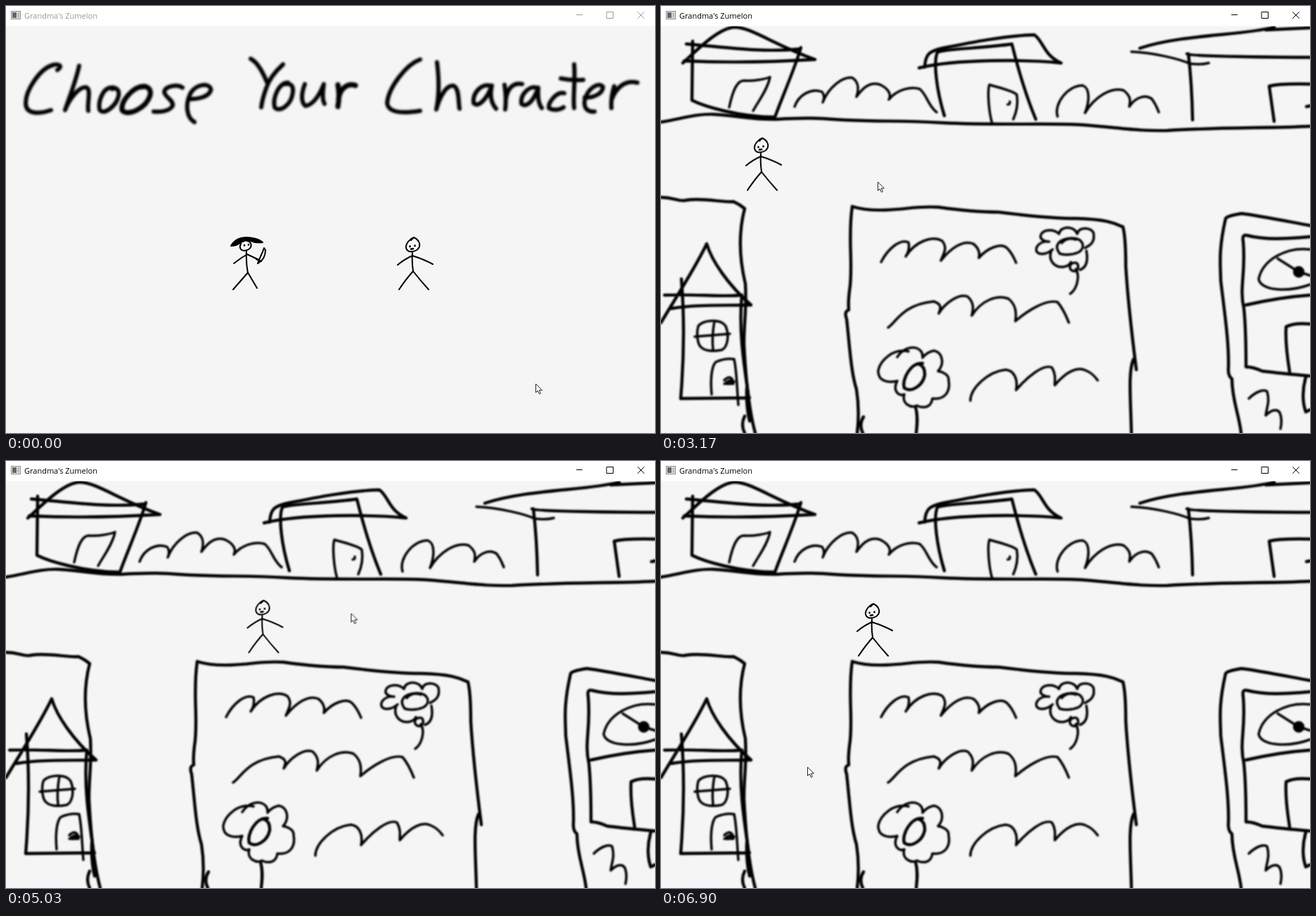
Recreate the animation shown at these times as an HTML page. Size 923 px wide and 607 px high, loop 6.99 s.

```html
<!DOCTYPE html>
<html lang="en">
<head>
<meta charset="utf-8">
<title>Grandma's Zumelon</title>
<style>
  html, body { margin: 0; width: 100%; height: 100%; overflow: hidden; background: #f5f5f5; }
  svg { display: block; width: 100vw; height: 100vh; }
  path { fill: none; stroke-linecap: round; stroke-linejoin: round; }
  .ink { stroke: #000; stroke-width: 4.4; filter: url(#soft); }
  .ink .thin { stroke-width: 3.5; }
  .lettering { stroke: #000; stroke-width: 6; filter: url(#blurry); }
  .lettering .heavy { stroke-width: 7.2; }
  .figure path { stroke: #000; stroke-width: 2; filter: url(#fine); }
  .figure .solid { fill: #000; }
  .figure .dots { stroke-width: 2.6; }
  .burst { stroke: #0808ff; stroke-width: 4.6; filter: url(#soft); }
  .caption { font: 11px "Open Sans", "Noto Sans", sans-serif; fill: currentColor; }
  .button { stroke: currentColor; stroke-width: 1; }

  .bar, .menu, .town, .burst { animation: 6990ms step-end infinite; }
  .bar { animation-name: focus; }
  .menu { animation-name: leave; }
  .town { animation-name: enter; }
  .burst { animation-name: hover; }
  .walker { animation: walk 6990ms linear infinite; }
  .cursor { animation: point 6990ms linear infinite; }

  @keyframes focus { 0% { color: #999; } 15.25%, 100% { color: #000; } }
  @keyframes leave { 0% { opacity: 1; } 18.83%, 100% { opacity: 0; } }
  @keyframes enter { 0% { opacity: 0; } 18.83%, 100% { opacity: 1; } }
  @keyframes hover { 0% { opacity: 0; } 5.52%, 100% { opacity: 1; } }

  @keyframes walk {
    0% { transform: translate(0, 0); }
    36.49% { transform: translate(0, 0); animation-timing-function: steps(10); }
    47.3% { transform: translate(110px, 16px); }
    47.45% { transform: translate(110px, 16px); animation-timing-function: steps(9); }
    57.6% { transform: translate(211px, 32px); animation-timing-function: steps(3); }
    60.6% { transform: translate(245px, 37px); }
    64.36% { transform: translate(245px, 37px); animation-timing-function: steps(10); }
    75.34% { transform: translate(354px, 14px); }
    75.55% { transform: translate(354px, 14px); animation-timing-function: steps(3); }
    78.77% { transform: translate(387px, 7px); animation-timing-function: steps(2); }
    80.92% { transform: translate(402px, 4px); }
    83.08% { transform: translate(402px, 4px); animation-timing-function: steps(9); }
    93.22% { transform: translate(302px, 19px); }
    93.29% { transform: translate(302px, 19px); animation-timing-function: steps(5); }
    98.65%, 100% { transform: translate(246px, 28px); }
  }

  @keyframes point {
    0% { transform: translate(753px, 537px); }
    .94% { transform: translate(753px, 537px); animation-timing-function: steps(6, jump-start); }
    7.81% { transform: translate(595px, 384px); animation-timing-function: step-end; }
    18.83% { transform: translate(595px, 388px); }
    28.09% { transform: translate(595px, 388px); animation-timing-function: steps(5); }
    33.28% { transform: translate(308px, 250px); }
    51.96% { transform: translate(308px, 250px); animation-timing-function: steps(5); }
    57.6% { transform: translate(440px, 222px); animation-timing-function: steps(4); }
    61.89% { transform: translate(461px, 215px); }
    65.46% { transform: translate(461px, 215px); animation-timing-function: steps(3); }
    68.75% { transform: translate(513px, 212px); }
    69.85% { transform: translate(513px, 212px); animation-timing-function: steps(5); }
    75.34% { transform: translate(400px, 235px); }
    75.55% { transform: translate(400px, 235px); animation-timing-function: steps(3); }
    78.77% { transform: translate(243px, 265px); animation-timing-function: steps(2); }
    80.92% { transform: translate(199px, 270px); }
    88.71% { transform: translate(199px, 270px); animation-timing-function: steps(4); }
    93.22% { transform: translate(210px, 412px); }
    93.29% { transform: translate(210px, 412px); animation-timing-function: steps(2); }
    95.44%, 100% { transform: translate(208px, 435px); }
  }
</style>
</head>
<body>
<svg viewBox="0 0 923 607" preserveAspectRatio="none">
  <defs>
    <filter id="fine" filterUnits="userSpaceOnUse" x="0" y="0" width="923" height="607"><feGaussianBlur stdDeviation=".4"/></filter>
    <filter id="soft" filterUnits="userSpaceOnUse" x="0" y="0" width="923" height="607"><feGaussianBlur stdDeviation=".8"/></filter>
    <filter id="blurry" filterUnits="userSpaceOnUse" x="0" y="0" width="923" height="607"><feGaussianBlur stdDeviation="1.4"/></filter>
    <g id="man" class="figure">
      <path d="M56 175C50 177 44 184 45 190C47 197 55 196 60 193C67 188 65 179 56 175L52 179"/>
      <path class="dots" d="M50.500 187.500v.5M57.500 186.500v.5M52 191.500L55 191"/>
      <path d="M54 197Q53 210 55 223M33 214Q44 205 54 201Q70 206 83 213M35 249Q45 234 55 223Q66 237 77 249"/>
    </g>
  </defs>

  <rect width="923" height="607" fill="#f5f5f5"/>

  <g class="menu">
    <g class="lettering">
      <!-- Choose -->
      <path d="M73 91C81 86 76 82 68 83.500C48 88 28 120 28 138C28 154 46 154 64 148"/>
      <path d="M104 85C100 105 90 130 84 148C90 132 104 114 114 115.500C122 118 115 138 117 149"/>
      <path d="M153 116C138 114 131 135 133 147C138 157 157 142 160 128C162 119 156 115 151 118"/>
      <path class="heavy" d="M197 114C180 114 163 136 165 148C172 158 199 146 205 127C207 117 200 113 193 115"/>
      <path d="M251 116C243 110 225 115 225 122C226 130 239 134 237 142C232 150 219 151 210 150"/>
      <path d="M260 132C270 133 289 130 291.500 119C290 109 272 110 263 123C254 140 257 159 268 165"/>
      <!-- Your -->
      <path d="M348 75C358 80 366 96 371 108M394 83C382 94 373 107 370 117C366 128 364 136 363 144"/>
      <path d="M401 109C388 109 379 130 382 144C388 152 406 142 408 122C409 113 404 109 397 111"/>
      <path d="M425 111C420 124 419 137 426 142C438 140 446 126 452 111C450 124 450 134 453 139"/>
      <path class="heavy" d="M472 112Q475 127 472 143M473 132C475 117 486 109 497 113"/>
      <!-- Character -->
      <path d="M589 76C569 83 544 116 542 138C544 154 570 152 589 149"/>
      <path d="M613 80C616 104 616 128 612 147C617 128 627 111 637 113.500C645 118 643 136 645 146"/>
      <path d="M690 114C677 109 663 123 665 138C672 146 685 130 691 113C688 126 690 138 697 146"/>
      <path d="M709 112Q712 131 710 147M711 132C713 117 722 108 734 111"/>
      <path d="M756 117C745 111 731 126 733 139C740 146 751 134 757 116C756 130 757 139 762 145"/>
      <path d="M794 124C784 121 771 136 772 145C778 149 787 148 793 144"/>
      <path d="M808 83C810 106 806 132 808 145M789 103Q804 106 821 105"/>
      <path d="M823 130C836 131 849 124 849 115C843 107 827 117 823 134C821 146 828 151 837 150"/>
      <path d="M865 114Q860 130 861 145M861 134C867 117 880 104 898 109"/>
    </g>

    <g class="figure">
      <path class="solid" d="M320 341C326 331 337 328 348 329.500Q360 331 365 336Q355 337 350 334.500Q341 331 333 337Q327 341 320 341z"/>
      <path d="M334 338C330 347 338 350 345 346C351 342 349 335 343 334"/>
      <path class="dots" d="M339 340v.5M345 339v.5"/>
      <path d="M342 347Q341 364 344 380M324 366Q334 358 343 353L360 361M323 403L344 379L357 401"/>
      <path d="M367 344C364 353 361 357 358 366Q369 360 369 347L367 344M356 360L363 363"/>
    </g>

    <path class="burst" d="M517 297Q535 308 557 320L560 296Q564 289 568 301L580 319Q593 300 607 292Q604 308 596 322Q620 310 641 306Q630 322 612 335L641 333L618 353Q636 358 655 357Q640 368 623 375L650 381L622 394L650 403L616 415L645 433L608 417Q613 430 611 446Q604 444 592 414Q578 435 569 448Q573 426 565 421Q552 430 541 448Q536 438 538 418L513 433Q522 420 540 412Q520 407 508 405Q525 401 541 398Q523 390 511 384Q530 382 546 381L510 362Q535 352 550 341Q529 336 514 335Q528 335 536 329Q517 305 517 297z"/>
    <use href="#man" x="524" y="154"/>
  </g>

  <g class="town">
    <g class="ink">
      <!-- upper row -->
      <path d="M31 81C45 69 80 31 105 30C130 31 160 55 219 76M36 54C80 57 140 67 198 61M33 78Q120 82 219 76"/>
      <path d="M45 50L44 134C60 142 110 158 162 158C172 130 190 90 199 59"/>
      <path class="thin" d="M97 144C102 120 108 106 118 106C132 107 148 104 155 101C152 118 138 136 131 149"/>
      <path class="thin" d="M190 143C196 126 214 116 229 122Q234 128 230 137C238 116 258 100 272 102C282 108 281 120 278 129C290 112 300 108 312 112C324 118 328 126 324 133C336 118 356 114 368 118C378 126 380 142 392 151"/>
      <path d="M375 87C376 66 384 64 400 60C440 52 490 42 531 41C544 50 544 70 569 81C520 76 420 75 367 88"/>
      <path d="M403 156C392 120 387 80 393 66C400 61 460 60 499 54C508 90 520 130 533 161"/>
      <path class="thin" d="M471 167C466 150 464 120 467 112C480 116 500 120 506 126C508 138 506 150 501 161M493 140q4 0 3-4"/>
      <path class="thin" d="M564 157C558 138 580 112 600 113C612 118 608 140 603 152C616 130 640 114 658 120C668 128 668 134 666 143C676 128 690 126 698 132C704 140 706 146 708 151"/>
      <path class="thin" d="M669 65C700 66 740 76 752 82Q768 84 779 81"/>
      <path d="M681 60C740 40 830 42 872 30M860 34L923 31M748 68Q752 72 923 73M750 68Q755 110 756 162M872 164L865 114Q880 110 923 111M918 143l5-1"/>
      <path d="M0 165C30 160 50 153 75 154C110 156 130 162 165 161C210 158 230 160 260 162C320 165 340 162 400 166C480 170 560 166 600 169C660 174 680 178 720 177C800 172 860 174 923 171"/>
      <!-- tower -->
      <path d="M0 272C20 272 24 279 36 276C60 272 90 280 103 278Q112 282 119 288C108 330 114 370 120 395C122 430 118 450 118 480C120 520 124 570 134 607"/>
      <path d="M0 450C24 410 50 370 65 338C72 362 95 396 128 425M5 411C50 409 80 414 114 411M15 430C50 424 90 426 128 425"/>
      <path d="M29 388C34 450 32 510 28 558L126 557M115 411C110 460 118 510 125 558M122 543Q121 570 126 590M119 583Q113 595 119 607"/>
      <path class="thin" d="M53 455C60 446 85 444 92 455C98 470 94 486 86 489C70 492 56 490 53 478Q50 466 53 455M48 470L98 466M76 448Q72 470 74 488"/>
      <path class="thin" d="M72 552C70 530 72 512 78 506Q92 500 104 502C108 520 108 545 110 567M90 532q8-8 12 0q-4 8-10 4q6-6 12-2M90 537h13"/>
      <!-- garden -->
      <path d="M272 285Q290 291 320 290C350 289 365 284 395 286C430 291 450 293 480 293C520 298 560 302 590 302C630 303 645 308 657 314Q661 330 661 370C664 420 670 470 676 517M672 502C664 520 668 560 669 607"/>
      <path d="M272 285C265 330 274 370 268 405Q266 422 267 431M267 432Q260 434 264 445C268 480 270 520 278 545C282 570 281 590 279 607M288 584Q281 595 287 607"/>
      <path class="thin" d="M313 364C322 346 340 330 352 336C354 344 352 350 348 356C362 334 386 326 400 334C408 344 402 352 398 362C412 344 430 332 444 338C452 344 454 352 452 358C464 344 484 336 492 344C500 352 502 358 505 365"/>
      <path class="thin" d="M323 457C334 450 344 424 388 420C400 424 398 430 395 437C404 422 424 408 436 413C446 422 444 432 442 440C456 418 478 410 494 416C504 424 506 434 504 448C520 434 548 416 564 421C572 430 576 440 580 450"/>
      <path class="thin" d="M440 561C440 544 464 520 490 517C502 518 508 530 505 546C520 528 544 508 556 514C562 524 560 532 560 539C576 520 592 512 604 518Q614 522 621 532"/>
      <path class="thin" d="M567 352C558 340 566 331 584 330C602 330 604 344 594 350Q580 356 567 352M570 337Q577 328 590 332"/>
      <path class="thin" d="M557 346Q548 354 538 352C528 348 536 333 552 335C534 334 538 320 550 319Q560 318 566 324C568 312 588 312 592 324C594 314 610 314 615 322C618 336 610 340 603 344"/>
      <path class="thin" d="M555 348C550 362 560 372 572 371Q580 370 583 364M605 348C608 364 604 372 596 375M590 365C580 364 578 376 588 377Q596 374 592 366M590 374C597 386 590 404 582 409"/>
      <path d="M372 508C356 506 342 530 346 543C356 550 372 540 375 525Q376 512 366 509"/>
      <path class="thin" d="M352 491C330 486 312 504 309 518C308 534 324 536 336 533C328 548 340 556 346 552C342 566 356 572 364 568C372 572 384 572 386 558C404 560 412 548 409 532C410 524 400 520 394 519C404 508 400 492 388 490Q378 492 372 500C374 484 350 478 336 499"/>
      <path d="M362 570C366 584 364 596 363 607"/>
      <!-- clock house -->
      <path d="M923 312C890 306 850 298 826 295Q806 298 803 302C792 350 796 370 796 390C802 440 808 480 807 514Q806 526 812 530C812 560 822 580 825 607"/>
      <path d="M923 328C890 331 860 333 833 326Q826 324 828 335C832 380 822 400 829 430C832 460 832 490 832 513Q842 513 855 519Q880 522 923 526M832 425Q880 414 923 411"/>
      <path class="thin" d="M923 346C890 342 856 360 850 388C852 404 890 408 923 396M877 359L907 378L923 383"/>
      <circle cx="907" cy="378" r="6"/>
      <path d="M894 520C890 495 888 470 889 456Q900 450 923 452M917 528C911 548 913 566 917 577L923 574"/>
      <path class="thin" d="M836 558C846 548 858 544 862 548C866 562 862 568 860 582C868 574 876 572 880 578Q884 588 881 601"/>
    </g>
    <g class="walker"><use href="#man"/></g>
  </g>

  <g class="bar">
    <rect width="923" height="28.500" fill="#fff"/>
    <rect x="7.500" y="7.500" width="13" height="11" fill="#eee" stroke="#888"/>
    <rect x="9" y="9" width="6" height="8" fill="#666"/>
    <rect x="16" y="9" width="3" height="8" fill="#bbb"/>
    <text class="caption" x="26" y="18">Grandma's Zumelon</text>
    <path class="button" d="M811.500 12.500h8M854.500 8.500h9v9h-9zM898.500 8.500l9 9M907.500 8.500l-9 9"/>
  </g>

  <g class="cursor">
    <path d="M.5.500V12.500L3.300 9.900L5.400 14.700L7.400 13.800L5.300 9.200H9z" style="fill:#fff;stroke:#222;stroke-width:1"/>
  </g>
</svg>
</body>
</html>
```
